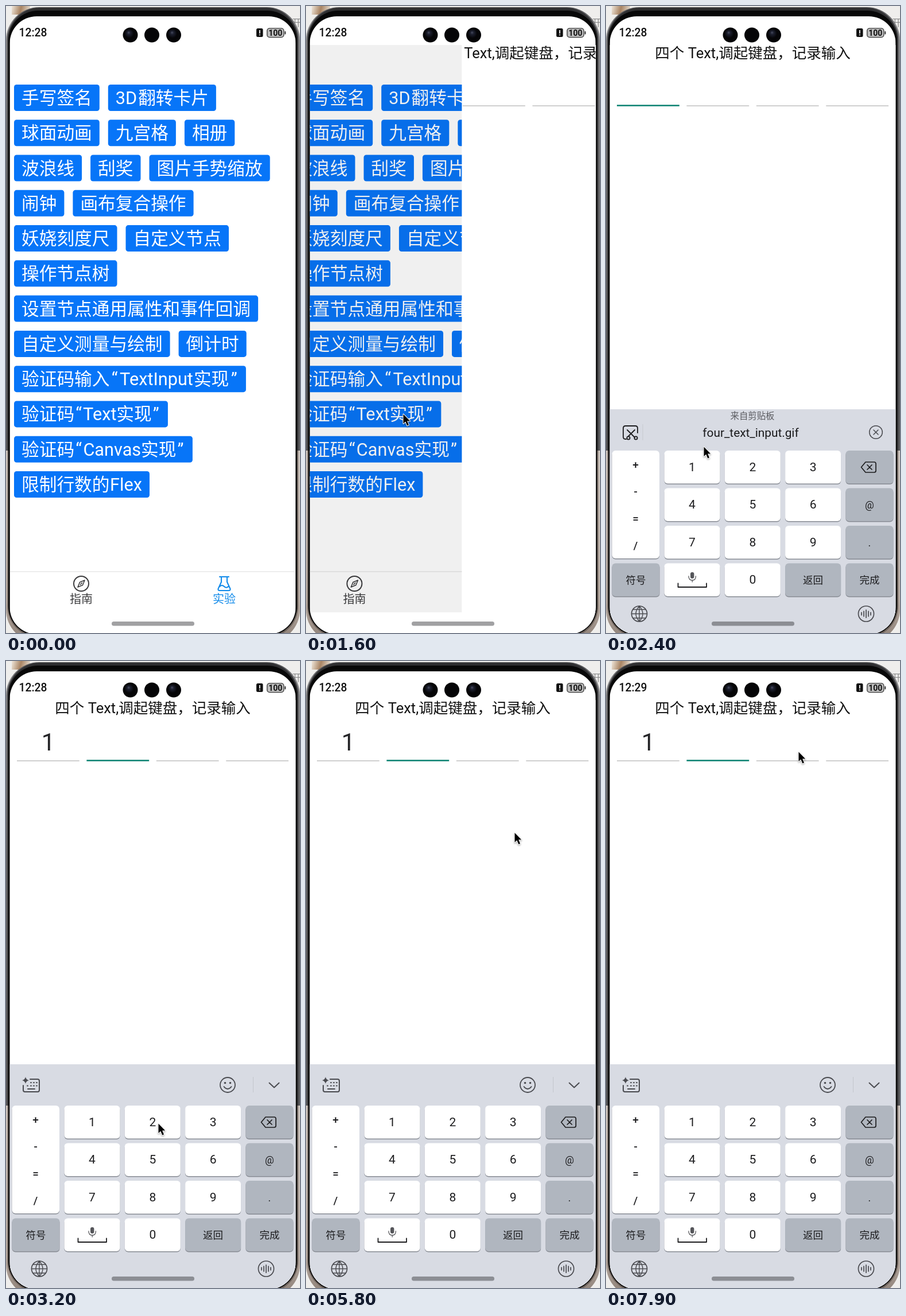
Animation, 512 px wide and 1093 px high, one loop 8000 ms. Source, as an HTML page with a canvas:

```html
<!DOCTYPE html>
<html lang="zh-CN">
<head>
<meta charset="utf-8">
<style>
html, body { margin: 0; width: 512px; height: 1093px; overflow: hidden; }
canvas { display: block; }
</style>
</head>
<body>
<canvas id="stage" width="512" height="1093"></canvas>
<script>
const c = document.getElementById('stage').getContext('2d');
const LOOP = 8000, STEP = 100;
const LEFT = 6.5, RIGHT = 504.5, WIDTH = RIGHT - LEFT;
const BLUE = '#0775f8', INK = '#1c1c1e', ICON = '#4a4b50';
const FIELD = 121.4;

const rows = [
  '手写签名|3D翻转卡片', '球面动画|九宫格|相册', '波浪线|刮奖|图片手势缩放',
  '闹钟|画布复合操作', '妖娆刻度尺|自定义节点', '操作节点树',
  '设置节点通用属性和事件回调', '自定义测量与绘制|倒计时',
  '验证码输入“TextInput实现”', '验证码“Text实现”', '验证码“Canvas实现”', '限制行数的Flex'
].map(row => row.split('|'));
// Label widths in em where Latin letters are mixed in
const mixed = { '3D翻转卡片': 5.28, [rows[8][0]]: 12.31, [rows[9][0]]: 7.88, [rows[10][0]]: 9.28, [rows[11][0]]: 6.84 };

// Pointer path: time, x, y
const path = [
  [100, 330, 1080], [900, 169, 711], [1800, 169, 711], [2400, 170, 768], [2600, 170, 808],
  [2900, 170, 808], [3200, 265, 806], [3600, 265, 806], [3800, 366, 806], [4200, 366, 806],
  [4400, 425, 804], [4700, 446, 802], [5500, 446, 802], [5800, 363, 299], [6300, 296, 134],
  [6500, 309, 145], [6900, 309, 145], [7300, 195, 146], [7700, 195, 146], [7900, 335, 158]
];
// Number of digits entered from each time on
const entries = [[0, 0], [2800, 1], [3500, 2], [4100, 3], [5000, 2], [5500, 1]];

// Remaining distance of a critically damped spring
function rest(t, start) {
  const u = Math.max(0, t - start) * 0.019;
  return u > 12 ? 0 : (1 + u) * Math.exp(-u);
}

function rect(x, y, w, h, color, r = 0) {
  c.fillStyle = color;
  c.beginPath();
  c.roundRect(x, y, w, h, r);
  c.fill();
}

function disc(x, y, r, color) {
  c.fillStyle = color;
  c.beginPath();
  c.arc(x, y, r, 0, 7);
  c.fill();
}

function line(d, color = ICON, width = 1.8) {
  c.strokeStyle = color;
  c.lineWidth = width;
  c.lineCap = c.lineJoin = 'round';
  c.stroke(new Path2D(d));
}

function ring(x, y, r, color = ICON, width = 1.8) {
  line(`M${x - r} ${y}a${r} ${r} 0 1 0 ${2 * r} 0a${r} ${r} 0 1 0 ${-2 * r} 0`, color, width);
}

function font(size, weight = 400) {
  c.font = `${weight} ${size}px Roboto, "Noto Sans CJK SC", "Noto Sans CJK", sans-serif`;
}

function text(s, x, y, size, color, weight = 400, align = 'center') {
  font(size, weight);
  c.textAlign = align;
  c.fillStyle = color;
  c.fillText(s, x, y);
}

function clipped(x, y, w, h, r, draw) {
  c.save();
  c.beginPath();
  c.roundRect(x, y, w, h, r);
  c.clip();
  draw();
  c.restore();
}

function fade(x0, y0, x1, y1, ...stops) {
  const g = c.createLinearGradient(x0, y0, x1, y1);
  stops.forEach(([at, color]) => g.addColorStop(at, color));
  return g;
}

function drawPhone() {
  rect(0, 0, 512, 1093, '#efeeec');
  rect(10, 0, 32, 15, fade(10, 0, 42, 8, [0, '#efe6da'], [0.5, '#a98463'], [1, '#e5ddd2']));
  text('开', 498, 35, 16, '#888', 400, 'left');
  // Metal rim, its darker inner edge, then the glass border
  rect(0, 2, 512, 1108, fade(0, 0, 0, 1093, [0, '#444446'], [0.03, '#858587'], [0.3, '#68686a'],
    [0.709, '#58585a'], [0.709, '#d2cac3'], [0.95, '#b9ada4'], [1, '#94877e']), 58);
  rect(2.2, 3.5, 507, 1098, fade(0, 0, 0, 1093, [0, '#2c2c2e'], [0.05, '#3c3c3e'],
    [0.709, '#38383a'], [0.709, '#847a73'], [1, '#6d625b']), 56);
  rect(4, 8, 503, 1090, '#080808', 52);
}

function drawButton(label, x, y) {
  const em = 30.7, quote = 15.6;
  const inner = (mixed[label] || label.length) * em, w = inner + 26;
  rect(x, y, w, 46, BLUE, 4.5);
  font(em);
  const parts = label.split(/([“”]|[A-Za-z\d]+)/).filter(Boolean)
    .map(s => [s, /[“”]/.test(s) ? quote : c.measureText(s).width]);
  const slack = inner - parts.reduce((sum, p) => sum + p[1], 0);
  const gap = slack / Math.max(1, parts.length - 1);
  let at = x + 13;
  for (const [s, width] of parts) {
    text(s, at + width / 2, y + 34, em, '#fff');
    at += width + gap;
  }
  return w;
}

function drawList() {
  rows.forEach((row, i) => {
    let x = 14;
    for (const label of row) x += drawButton(label, x, 137 + i * 61.27) + 15;
  });
  rect(LEFT, 985.5, WIDTH, 1, '#dcdcdc');
  ring(131, 1007, 13, '#3c3c3e', 2);
  line('M137 1001L133.5 1009.5L125 1013L128.5 1004.5ZM129.5 1008.5L132.5 1005.5', '#3c3c3e', 1.6);
  text('指南', 131, 1041, 20, '#3c3c3e');
  const tab = '#138bea';
  line('M372 995H388M375 995V1004L369.5 1016Q369 1019 372 1019H388Q391 1019 390.5 1016L385 1004V995M372 1012Q376 1008 380 1012T388 1011', tab, 2.1);
  text('实验', 380, 1041, 20, tab);
}

function drawForm(count) {
  rect(LEFT, 68, WIDTH, 1025, '#fff');
  text('四个 Text,调起键盘，记录输入', 255.5, 91, 25.5, '#111');
  for (let i = 0; i < 4; i++) {
    const x = 19 + i * FIELD;
    if (i === count) rect(x, 172.3, 108.8, 2.5, '#07806f');
    else rect(x, 173.6, 108.8, 1, '#a2a2a2');
    if (i < count) text(i + 1, x + 54.5, 156, 42, '#262628');
  }
}

function drawKey(x, y, w, h, label, gray) {
  rect(x, y + 1.5, w, h, '#888c94', 6);
  rect(x, y, w, h, gray ? '#b0b6bf' : '#fff', 6);
  if (label) text(label, x + w / 2, y + h / 2 + 7, /\d/.test(label) ? 21 : 17.5, INK, /[\d.@]/.test(label) ? 400 : 500);
}

function drawClipboardBar() {
  text('来自剪贴板', 255, 719.5, 15.4, '#5a5b60');
  text('four_text_input.gif', 252, 750.5, 20.8, '#1a1a1c');
  line('M35 755H34Q30 755 30 751V736Q30 732 34 732H51Q55 732 55 736V744M37 739L50 752M50 739L39 750', INK);
  ring(39, 753, 2.6, INK);
  ring(52, 753, 2.6, INK);
  rect(63.5, 729, 1, 28, '#c6c9d0');
  ring(470, 743, 11.3, ICON, 1.5);
  line('M466 739L474 747M474 739L466 747', ICON, 1.5);
}

function drawToolBar() {
  line('M42 729H55Q58 729 58 732V748Q58 751 55 751H33Q30 751 30 748V740', ICON, 2);
  line('M43 735H44M48 735H49M53 735H54M37 740.5H38M43 740.5H44M48 740.5H49M53 740.5H54M38 746H50', ICON, 2);
  c.fillStyle = ICON;
  c.fill(new Path2D('M34 725Q35 730 40 731Q35 732 34 737Q33 732 28 731Q33 730 34 725'));
  ring(386, 739, 13);
  disc(381.5, 735.5, 1.8, ICON);
  disc(390.5, 735.5, 1.8, ICON);
  line('M379.5 742Q386 750 392.5 742');
  rect(430, 725, 1, 27, '#c3c6cd');
  line('M458.5 735.5L467 743.5L475.5 735.5', ICON, 2);
}

function drawKeyboard(offset, typed) {
  c.save();
  c.translate(0, offset);
  rect(LEFT, 703, WIDTH, 400, '#d8dbe3');
  typed ? drawToolBar() : drawClipboardBar();

  drawKey(10.5, 775, 82.5, 188);
  [...'+-=/'].forEach((s, i) => text(s, 51.5, 806 + i * 47, 19, INK, 500));
  const labels = ['1', '2', '3', '', '4', '5', '6', '@', '7', '8', '9', '.', '', '0', '返回', '完成'];
  labels.forEach((label, i) => {
    const col = i % 4;
    drawKey(101.5 + col * 105.3, 775 + (i >> 2) * 65.5, col < 3 ? 97 : 83, 57.5, label, col > 2 || i === 14);
  });
  drawKey(10.5, 971.5, 83, 57.5, '符号', true);

  line('M452 795H467Q470 795 470 798V810Q470 813 467 813H452L444.5 804ZM455 800L463 808M463 800L455 808', INK, 1.7);
  rect(147, 987, 6.4, 11, '#55565a', 3.2);
  line('M144 994Q144 1001 150.2 1001T156.4 994M150.2 1001V1004', '#55565a', 1.3);
  line('M125.5 1006.5V1013H175V1006.5', INK, 1.8);

  ring(58, 1059.5, 13.5, ICON, 1.7);
  line('M58 1046Q46 1059.5 58 1073Q70 1059.5 58 1046V1073M44.5 1059.5H71.5M47 1052H69M47 1067H69', ICON, 1.4);
  ring(453, 1059.5, 13.5, ICON, 1.7);
  [3, 6, 9, 6, 3].forEach((h, i) => line(`M${445 + i * 4} ${1059.5 - h * 0.75}v${h * 1.5}`, ICON, 1.7));
  c.restore();
}

function drawStatus(clock) {
  text(clock, 22.5, 52.5, 19.3, '#111', 500, 'left');
  for (const x of [216.5, 254, 292]) {
    disc(x, 50.5, 13, '#050507');
    if (x === 254) continue;
    const g = c.createRadialGradient(x - 3, 46, 0, x - 2, 48, 8);
    g.addColorStop(0, '#4a4f62');
    g.addColorStop(0.35, '#1d2030');
    g.addColorStop(1, '#050507');
    disc(x - 2, 48, 8, g);
  }
  rect(436, 39, 11.5, 15, '#111', 2.5);
  rect(441, 42, 1.7, 6, '#fff');
  rect(441, 49.5, 1.7, 1.8, '#fff');
  rect(454, 38.2, 30.5, 17, '#3a3a3a', 5);
  rect(455.3, 39.5, 27.9, 14.4, '#bdbdbd', 4);
  rect(485.3, 44, 2, 5.5, '#3a3a3a', 1);
  text('100', 469.2, 51.8, 14, '#111', 700);
}

function drawPointer(t) {
  if (t < path[0][0]) return;
  const i = path.findIndex(p => p[0] > t);
  const [t0, x0, y0] = path[i < 0 ? path.length - 1 : i - 1];
  const [t1, x1, y1] = i < 0 ? [t0 + 1, x0, y0] : path[i];
  const k = (t - t0) / (t1 - t0);
  c.save();
  c.translate(x0 + (x1 - x0) * k, y0 + (y1 - y0) * k);
  const arrow = 'M0.5 0.5V17L4.3 13.6L7.2 20.5L10 19.3L7.1 12.6H12.2Z';
  c.shadowColor = 'rgba(0,0,0,.35)';
  c.shadowBlur = 3;
  c.shadowOffsetY = 1.5;
  line(arrow, '#fff', 2);
  c.shadowColor = 'transparent';
  c.fillStyle = '#000';
  c.fill(new Path2D(arrow));
  c.restore();
}

function draw(t) {
  const count = entries.findLast(e => e[0] <= t)[1];
  const left = rest(t, 1517), done = 1 - left;
  drawPhone();
  clipped(LEFT, 18, WIDTH, 1077, 47, () => {
    rect(LEFT, 18, WIDTH, 1077, '#fff');
    if (left > 0) clipped(LEFT, 68, WIDTH, 989, 0, () => {
      const shift = WIDTH * 0.2 * done;
      c.translate(-shift, 0);
      drawList();
      c.translate(shift, 0);
      rect(LEFT, 68, WIDTH, 989, `rgba(0,0,0,${0.122 * done})`);
    });
    if (done > 0) clipped(LEFT + WIDTH * left, 68, WIDTH, 1025, 0, () => {
      c.translate(WIDTH * left / 2, 0);
      rect(-WIDTH, 68, WIDTH * 3, 1025, '#fff');
      drawForm(count);
    });
    if (t > 1600) drawKeyboard(395 * rest(t, 1600), t >= 2800);
    drawStatus(t < 7500 ? '12:28' : '12:29');
    rect(184, 1073, 144, 7.5, 'rgba(50,50,55,.46)', 4);
  });
  drawPointer(t);
}

function tick(now) {
  draw(Math.floor(now % LOOP / STEP) * STEP);
  requestAnimationFrame(tick);
}
requestAnimationFrame(tick);
</script>
</body>
</html>
```
